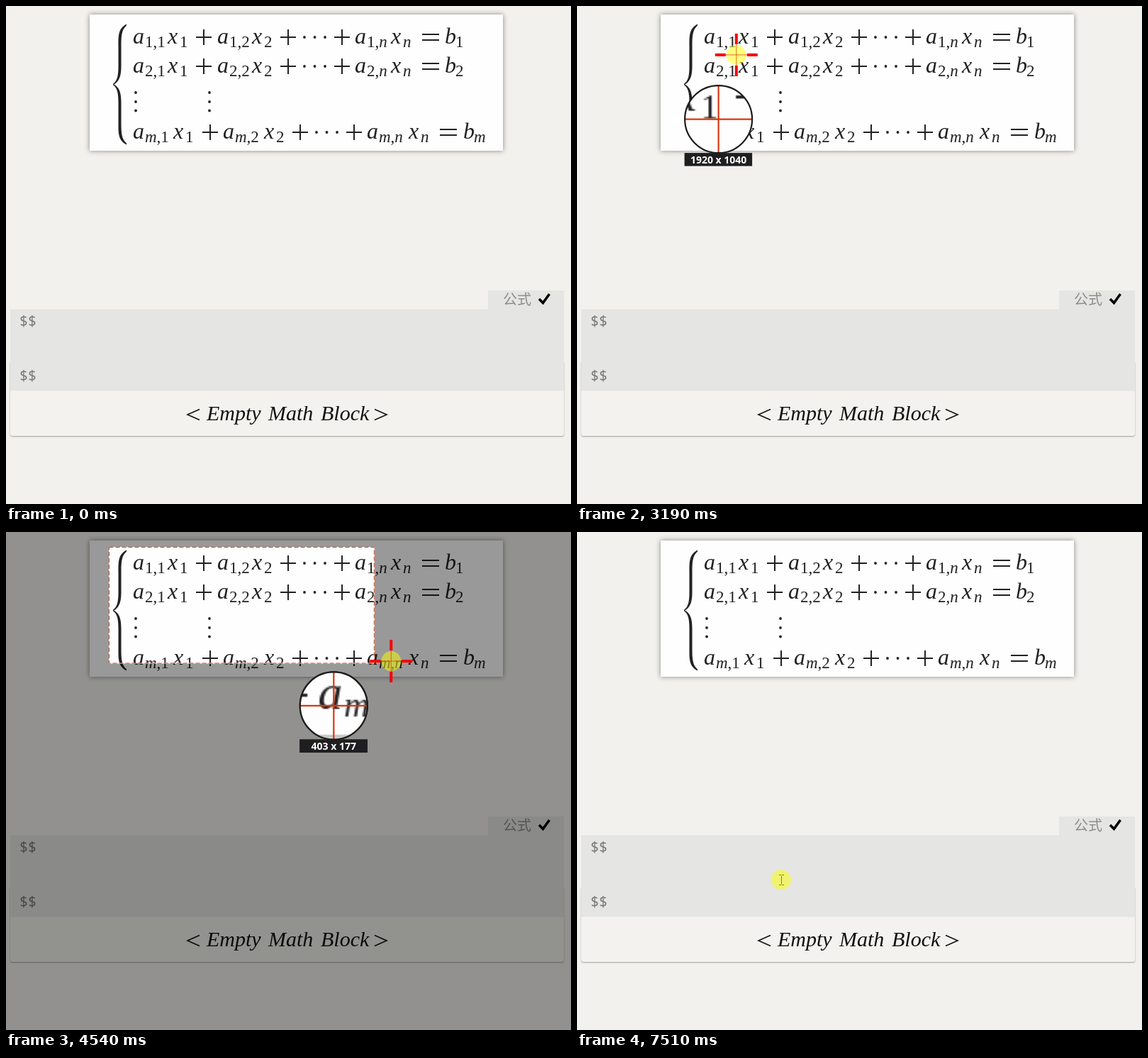
Animation of 797 by 702 pixels, one loop 8 s. Source, as an HTML page with a canvas:

```html
<!DOCTYPE html>
<html lang="zh">
<head>
<meta charset="utf-8">
<title>Formula capture</title>
<style>
html, body { margin: 0; width: 797px; height: 702px; overflow: hidden; background: #f2f1ed; }
canvas { display: block; }
</style>
</head>
<body>
<canvas id="stage" width="797" height="702"></canvas>
<script>
const W = 797, H = 702, LOOP = 8000;
const MATH = '"Liberation Serif", "Times New Roman", serif';
const ctx = document.getElementById('stage').getContext('2d');
const page = document.createElement('canvas');
page.width = W;
page.height = H;

function text(g, str, x, y, font, color) {
  g.font = font;
  g.fillStyle = color;
  g.fillText(str, x, y);
}

function line(g, color, width, ...pts) {
  g.strokeStyle = color;
  g.lineWidth = width;
  g.beginPath();
  for (let i = 0; i < pts.length; i += 2) g.lineTo(pts[i], pts[i + 1]);
  g.stroke();
}

function disc(g, x, y, r, color) {
  g.fillStyle = color;
  g.beginPath();
  g.arc(x, y, r, 0, 7);
  g.fill();
}

// ---- static page ----
const INK = '#222';

function sub(g, str, x, y) {
  for (const ch of str) {
    text(g, ch, x, y, (/[a-z]/.test(ch) ? 'italic ' : '') + '23px ' + MATH, INK);
    x += g.measureText(ch).width;
  }
}

function variable(g, name, index, x, y) {
  text(g, name, x, y, 'italic 32px ' + MATH, INK);
  sub(g, index, x + (name === 'b' ? 15 : 17), y + 5);
}

function plus(g, x, y) {
  line(g, INK, 2, x, y - 9, x + 22, y - 9);
  line(g, INK, 2, x + 11, y - 20, x + 11, y + 2);
}

// xs: a x + a x + dots + a x = b
function equation(g, row, xs, y) {
  const [a1, x1, p1, a2, x2, p2, dots, p3, an, xn, eq, b] = xs;
  variable(g, 'a', row + ',1', a1, y);
  variable(g, 'x', '1', x1, y);
  variable(g, 'a', row + ',2', a2, y);
  variable(g, 'x', '2', x2, y);
  variable(g, 'a', row + ',n', an, y);
  variable(g, 'x', 'n', xn, y);
  variable(g, 'b', row, b, y);
  for (const p of [p1, p2, p3]) plus(g, p, y);
  for (let i = 0; i < 3; i++) disc(g, dots + i * 14.5, y - 9, 1.9, INK);
  for (const d of [-13, -5]) line(g, INK, 2, eq, y + d, eq + 24, y + d);
}

function halfBrace(g, dir) {
  const y = d => 110.5 - dir * d;
  g.fillStyle = INK;
  g.beginPath();
  g.moveTo(170, y(85));
  g.bezierCurveTo(158, y(79), 158.5, y(68), 158.5, y(54));
  g.lineTo(158.5, y(26));
  g.bezierCurveTo(158.5, y(12), 157, y(5), 151, y(0.7));
  g.lineTo(151, y(-0.7));
  g.bezierCurveTo(161, y(4), 162.5, y(14), 162.5, y(26));
  g.lineTo(162.5, y(54));
  g.bezierCurveTo(162.5, y(68), 163, y(77), 170, y(83));
  g.fill();
}

function drawPage(g) {
  g.fillStyle = '#f2f1ed';
  g.fillRect(0, 0, W, H);

  g.save();
  g.shadowColor = 'rgba(0,0,0,.45)';
  g.shadowBlur = 7;
  g.fillStyle = '#fefefe';
  g.fillRect(118, 12, 583, 192);
  g.restore();

  halfBrace(g, 1);
  halfBrace(g, -1);
  const upper = [179, 228, 268, 298, 347, 387, 421, 463, 492, 543, 587, 619];
  const lower = [179, 236, 277, 306, 364, 404, 438, 480, 509, 568, 612, 645];
  equation(g, '1', upper, 53);
  equation(g, '2', upper, 94);
  equation(g, 'm', lower, 187);
  for (const x of [183, 287])
    for (const y of [122, 135, 147.5]) disc(g, x, y, 1.9, INK);

  // preview panel
  g.save();
  g.shadowColor = 'rgba(0,0,0,.35)';
  g.shadowBlur = 2;
  g.shadowOffsetY = 1;
  g.fillStyle = '#f3f2ee';
  g.beginPath();
  g.roundRect(6, 500, 781, 106, 3);
  g.fill();
  g.restore();

  // source block with its tab
  g.fillStyle = '#e5e5e3';
  g.fillRect(6, 427.5, 781, 115);
  g.fillRect(680, 401, 107, 27);
  text(g, '公式', 701, 421, '300 20px "Noto Sans CJK SC", "Noto Sans CJK", sans-serif', '#8c8c8c');
  line(g, '#000', 3.6, 752, 413, 757.5, 418.5, 766.5, 406);
  for (const y of [451, 528]) text(g, '$$', 19, y, '20px "Noto Sans Mono", monospace', '#777');

  const words = [['Empty', 283], ['Math', 370], ['Block', 444]];
  for (const [word, x] of words) text(g, word, x, 584, 'italic 30px ' + MATH, '#111');
  line(g, '#111', 1.6, 273, 568.5, 256, 576, 273, 583.5);
  line(g, '#111', 1.6, 520, 568.5, 537, 576, 520, 583.5);
}

// ---- pointer ----
const PATH = [
  [760, 670, 483], [1000, 560, 300], [1300, 440, 138], [1560, 398, 192],
  [1960, 422, 313], [2430, 422, 313], [2800, 345, 195], [3110, 257, 100],
  [3190, 225, 69], [3500, 168, 33], [3850, 146, 21], [4000, 146, 21],
  [4080, 187, 43], [4270, 375, 125], [4460, 519, 185], [4540, 543, 182],
  [4920, 640, 196], [5400, 678, 203], [5700, 682, 200], [6250, 682, 200],
  [6400, 595, 265], [6650, 370, 430], [6890, 288, 490], [LOOP, 288, 490]
];
const LAG = 80, CAPTURE = 2110, DRAG = 4150, DONE = 5780;

function pointerAt(t) {
  const i = Math.max(1, PATH.findIndex(p => p[0] > t));
  const [t0, x0, y0] = PATH[i - 1], [t1, x1, y1] = PATH[i];
  const k = Math.max(0, (t - t0) / (t1 - t0));
  return [x0 + (x1 - x0) * k, y0 + (y1 - y0) * k];
}

function drawCursor(x, y) {
  if (x > 117 && x < 702 && y > 11 && y < 205) {
    const arrow = [0, 0, 0, 13, 3, 10.3, 5.5, 16, 7.7, 15, 5.2, 9.5, 9.5, 9.3];
    ctx.fillStyle = '#111';
    ctx.beginPath();
    for (let i = 0; i < arrow.length; i += 2) ctx.lineTo(x + arrow[i], y + arrow[i + 1]);
    ctx.fill();
    return;
  }
  x = Math.round(x) + .5;
  y = Math.round(y) + .5;
  line(ctx, '#111', 1, x, y - 6, x, y + 6);
  for (const d of [-7, 7]) {
    line(ctx, '#111', 1, x - 3.5, y + d, x - .5, y + d);
    line(ctx, '#111', 1, x + .5, y + d, x + 3.5, y + d);
  }
}

function drawCrosshair(x, y) {
  line(ctx, 'rgba(225,60,0,.75)', 1, x - 15, y, x + 15, y);
  line(ctx, 'rgba(225,60,0,.75)', 1, x, y - 15, x, y + 15);
  for (const s of [-1, 1]) {
    line(ctx, '#fa0008', 4, x + s * 15, y, x + s * 30, y);
    line(ctx, '#fa0008', 4, x, y + s * 15, x, y + s * 30);
  }
}

// ---- capture overlay ----
function drawLens(x, y, label) {
  const cx = x - 57, cy = y + 60, r = 47.5, zoom = 2.15;
  ctx.save();
  ctx.beginPath();
  ctx.arc(cx, cy, r, 0, 7);
  ctx.clip();
  ctx.fillStyle = '#f2f1ed';
  ctx.fillRect(cx - r, cy - r, 2 * r, 2 * r);
  ctx.drawImage(page, cx - x * zoom, cy - y * zoom, W * zoom, H * zoom);
  line(ctx, '#d9380f', 2.2, cx - r, cy, cx + r, cy);
  line(ctx, '#d9380f', 2.2, cx, cy - r, cx, cy + r);
  ctx.restore();
  ctx.strokeStyle = '#1c1c1c';
  ctx.lineWidth = 2.2;
  ctx.beginPath();
  ctx.arc(cx, cy, r, 0, 7);
  ctx.stroke();
  ctx.fillStyle = '#1f1f21';
  ctx.fillRect(cx - 48, cy + 47.5, 95.5, 18.5);
  ctx.textAlign = 'center';
  text(ctx, label, cx, cy + 62, 'bold 14px "Noto Sans", "Open Sans", sans-serif', '#fff');
  ctx.textAlign = 'left';
}

function drawSelection(x, y) {
  const left = 145.5, top = 21.5, w = Math.max(1, x - left), h = Math.max(1, y - top);
  ctx.fillStyle = 'rgba(0,0,0,.4)';
  ctx.beginPath();
  ctx.rect(0, 0, W, H);
  ctx.rect(left, top, w, h);
  ctx.fill('evenodd');
  ctx.strokeStyle = '#fff';
  ctx.lineWidth = 1;
  ctx.strokeRect(left, top, w, h);
  ctx.setLineDash([6, 3]);
  ctx.strokeStyle = '#d9481f';
  ctx.strokeRect(left, top, w, h);
  ctx.setLineDash([]);
  return Math.round(w * 1.079) + ' x ' + Math.round(h * 1.083);
}

const within = (t, a, b) => t >= a && t < b;

function draw(t) {
  const [x, y] = pointerAt(t);
  ctx.drawImage(page, 0, 0);
  if (within(t, CAPTURE, 2640) || within(t, DONE, 6490) || within(t, 7040, 7510))
    line(ctx, '#222', 1, 19.5, 465, 19.5, 504);

  const capturing = within(t, CAPTURE, DONE);
  if (capturing) {
    const [lx, ly] = pointerAt(t - LAG);
    drawLens(lx, ly, t < DRAG ? '1920 x 1040' : '');
    if (t >= DRAG) {
      const size = drawSelection(lx, ly);
      drawLens(lx, ly, size);
    }
  } else if (t >= 760) {
    drawCursor(x, y);
  }
  if (t >= CAPTURE) disc(ctx, x, y, 14, 'rgba(255,255,0,.5)');
  if (capturing) drawCrosshair(x, y);
}

drawPage(page.getContext('2d'));
function frame() {
  draw(performance.now() % LOOP);
  requestAnimationFrame(frame);
}
frame();
</script>
</body>
</html>
```
